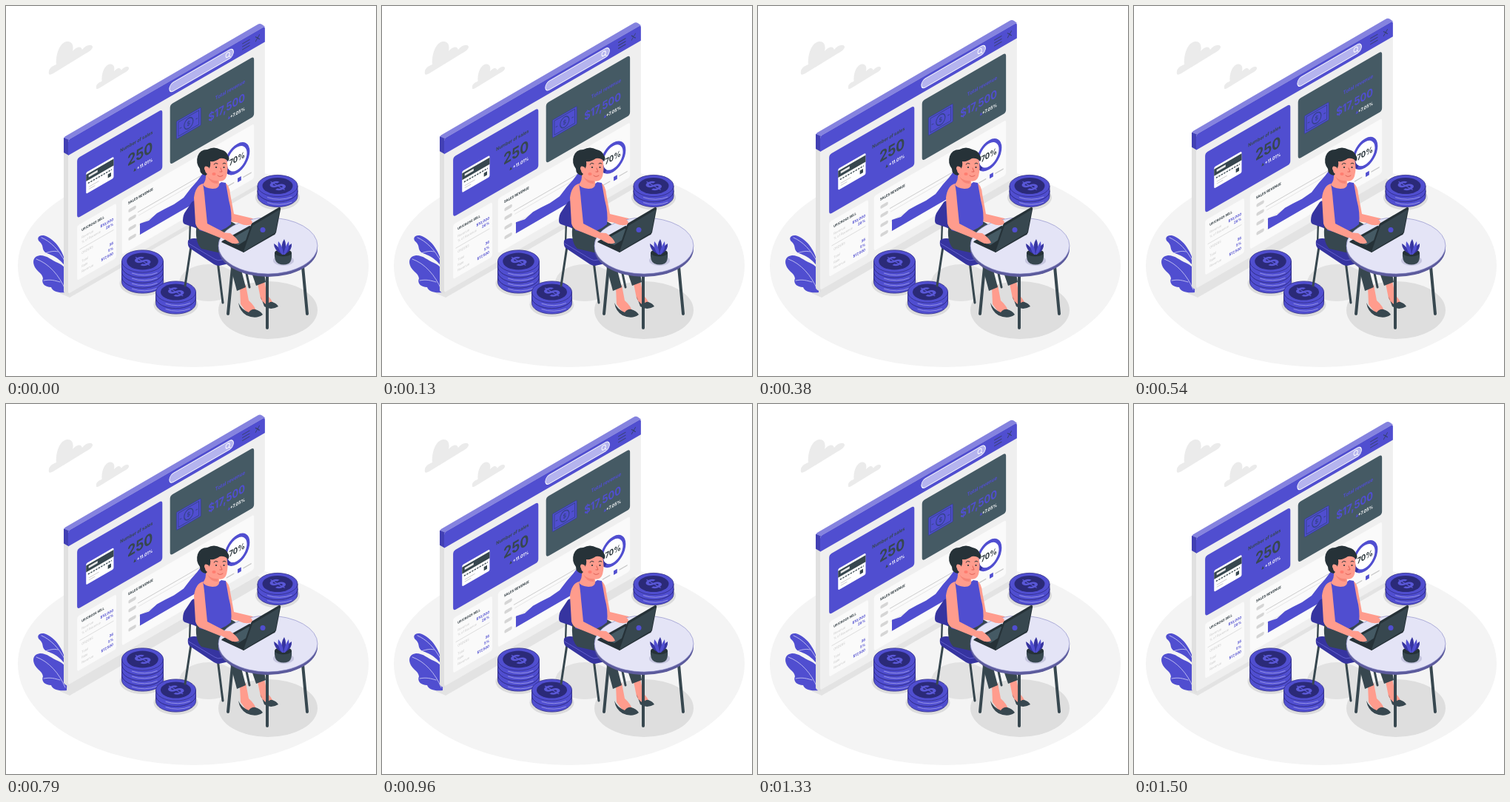
Recreate the animation shown at these times as an HTML page. Size 500 by 500 pixels, loop 1540 ms.

```html
<!DOCTYPE html>
<html lang="en">
<head>
<meta charset="utf-8">
<title>Sales dashboard</title>
<style>
  html, body { margin: 0; width: 100%; height: 100%; overflow: hidden; background: #fff; }
  svg { display: block; width: 100%; height: 100%; }
  text { font-family: Inter, Roboto, sans-serif; font-weight: 700; }
  .p { fill: #504ed0; } .pd { fill: #3634a0; } .pl { fill: #8583df; }
  .d { fill: #37474f; } .k { fill: #263238; } .s { fill: #455a64; }
  .skin { fill: #ff9c8d; } .w { fill: #fff; }
  .line { fill: none; stroke-linecap: round; stroke-linejoin: round; }
  .end { text-anchor: end; } .mid { text-anchor: middle; }
  .small { font-size: 4.5px; } .soft { fill: #c9c9c9; font-weight: 400; }
</style>
</head>
<body>
<svg viewBox="0 0 500 500">
  <ellipse cx="253" cy="351" rx="237" ry="137" fill="#f4f4f4"/>
  <defs>
    <path id="cloud" d="M58 92C57 86 60 82 68 79C67 66 72 50 82 48C89 47 92 53 90 61C95 55 101 53 103 59C108 52 116 51 117 55C117 59 112 62 108 64L64 91Q59 94 58 92Z"/>
  </defs>
  <g fill="#ebebeb">
    <use href="#cloud"/>
    <use href="#cloud" transform="translate(78.5 42.5) scale(.75)"/>
  </g>
  <path fill="#e3e3e3" d="M70 387L86 394L352 240L340 232Z"/>

  <g id="leaves">
    <path class="p" d="M82 354C79 334 68 315 51 310C43 309 41 315 46 319C52 325 47 330 55 334C62 337 70 338 82 354Z"/>
    <path class="p" d="M82 387C71 388 63 386 61 380C53 380 47 375 50 368C49 361 43 360 39 353C35 345 37 338 46 337C56 337 62 344 70 347C77 350 81 354 83 362Z"/>
    <path class="line" stroke="#d5d4f7" stroke-width=".8" d="M48 313C60 318 72 330 80 346M41 342C58 348 72 364 80 383M51 371C60 369 66 371 73 373M53 334C62 331 66 331 70 332"/>
  </g>

  <g id="board">
    <path fill="#e0e0e0" d="M78 196V386Q79 389 85 391V198Z"/>
    <path class="pl" d="M78 179Q79 176 82 175L340 25Q343 23 346 25L350 28L84 183Z"/>
    <path fill="#4240b4" d="M78 178L85 181V202L78 198Z"/>
    <g transform="matrix(.866 -.5 0 1 84 181)">
      <rect width="307" height="208" rx="3" fill="#efefef"/>
      <path class="p" d="M0 21V3Q0 0 3 0H304Q307 0 307 3V21Z"/>
      <rect x="158" y="4" width="100" height="12" rx="6" fill="#b5b4ee" stroke="#fff"/>
      <g class="line" stroke="#fff"><circle cx="249" cy="9.5" r="3"/><path d="M251 12L253 14"/></g>
      <path class="line" stroke="#37416f" stroke-width="1.1" d="M272 6H283M272 10H283M272 14H283M292.5 7L298.500 13M298.500 7L292.500 13"/>

      <rect class="p" x="14" y="32" width="133" height="81" rx="4"/>
      <rect class="s" x="159" y="32" width="131" height="81" rx="4"/>
      <rect x="14" y="123" width="61" height="74" rx="3" fill="#fafafa"/>
      <rect x="84" y="123" width="206" height="74" rx="3" fill="#fafafa"/>

      <g class="end">
        <text class="d" x="132" y="57.5" font-size="6.4">Number of sales</text>
        <text class="d" x="132" y="82" font-size="20.5">250</text>
        <text class="w" x="132" y="94.5" font-size="6.2">+11.01%</text>
        <text class="p" x="276" y="61" font-size="7">Total revenue</text>
        <text class="p" x="276" y="85" font-size="15">$17,500</text>
        <text class="w" x="276" y="97.5" font-size="6.2">+7.05%</text>
      </g>
      <path class="d" d="M102 94L104 90L106 94Z"/>
      <path class="p" d="M249 97L251 93L253 97Z"/>

      <rect class="w" x="28" y="58" width="43" height="29" rx="2"/>
      <path class="d" d="M28 61H71V70H28Z"/>
      <path fill="#e6e6e6" d="M32 63.5H46V66.500H32Z"/>
      <path class="line" stroke="#37474f" stroke-width="1.600" style="stroke-linecap:butt" stroke-dasharray="2.6 1.4" d="M31 74H68"/>
      <path stroke="#ccc" d="M32 79.500H48M32 82.500H42"/>
      <rect class="d" x="62" y="77.500" width="5" height="5"/>

      <rect class="p" x="169" y="59.500" width="38" height="24" rx="1" stroke="#35438a" stroke-width=".8"/>
      <g fill="none" stroke="#35438a">
        <rect x="172" y="62" width="32" height="19"/>
        <circle cx="188" cy="71.500" r="7" stroke-width="1.4"/>
        <path d="M174 71.500H177M199 71.500H202"/>
      </g>
      <text class="mid" x="188" y="74.500" font-size="8" fill="#35438a">$</text>

      <text class="k small" x="21" y="134">UP/CROSS SELL</text>
      <g id="rows" class="small"></g>
      <path stroke="#d2d2d2" stroke-width=".7" d="M18 157H71"/>

      <text class="k" x="93.5" y="134" font-size="4.8">SALES REVENUE</text>
      <path stroke="#e3e3e3" stroke-width=".8" d="M110 157H220M110 170H220M110 183H220"/>
      <path stroke="#bbb" stroke-width=".7" d="M108.500 152H216"/>
      <g id="pills" fill="#d5d5d5"></g>

      <g fill="none" stroke-width="4.4">
        <circle class="w" cx="263.5" cy="157" r="17.6" stroke="#504ed0"/>
        <circle cx="263.5" cy="157" r="17.6" stroke="#3634a0" stroke-dasharray="14 97" stroke-dashoffset="-40"/>
      </g>
      <text class="k mid" x="263.5" y="161" font-size="11">70%</text>
      <rect class="p" x="264.5" y="184" width="5.5" height="5.5"/>
      <path stroke="#c9c9c9" stroke-width="1.4" d="M273 187H286M247 187H259"/>
    </g>
    <path class="p" d="M181 294L193 290L204 280L215 274L227 268L240 259L250 246L258 237L267 225L276 218V254L181 309Z"/>
  </g>

  <ellipse cx="274" cy="374" rx="40" ry="25" fill="#e2e2e2"/>
  <ellipse cx="354" cy="411" rx="67" ry="39" fill="#dedede"/>
  <g id="coins"></g>

  <g id="chair">
    <path class="line" stroke="#37474f" stroke-width="3" d="M250 325L242 378M286 345L293 401M323 352L329 380"/>
    <path class="line" stroke="#37474f" stroke-width="2.4" d="M249 292L248 320"/>
    <path class="pd" d="M239 290Q239 282 243 277L251 265Q255 261 258 266L262 303L254 299L242 295Q239 294 239 290Z"/>
    <path class="pd" d="M246 317Q250 312 262 315L314 338Q316 344 306 347L288 351Q284 351 281 349L248 327Q245 324 246 317Z"/>
    <path class="line" stroke="#6b69d6" stroke-width=".8" d="M247 321L282 342Q286 345 292 343L312 338"/>
  </g>

  <g id="woman">
    <path class="skin" d="M316 380L324 377L328 398Q337 406 338 413L326 415L317 403ZM340 375L349 371L353 391Q360 397 361 404L350 405L344 395Z"/>
    <path class="d" d="M314 401Q318 410 328 414Q332 409 337 410Q344 412 347 417Q338 424 325 418Q316 413 314 401ZM344 392Q345 400 353 404Q356 399 360 400Q366 402 368 406Q358 412 349 406Z"/>
    <path class="d" d="M258 293L302 290Q330 305 343 327L351 373L338 378L326 343L313 338L324 380L312 385L299 336L264 328Q254 318 258 293Z"/>
    <path class="skin" d="M296 239Q302 242 303 254L308 281L333 287Q337 291 333 295L326 295L303 291Q299 288 298 283L291 255Z"/>
    <path class="p" d="M265 241Q279 248 291 238L297 239L301 262Q306 280 304 295Q286 311 261 303L264 266Z"/>
    <path class="skin" d="M270 225L286 231L288 237Q290 247 279 247Q268 246 266 241Q271 236 270 225Z"/>
    <path class="skin" d="M266 240Q256 243 254 259L256 294Q258 301 264 303L291 314L304 321Q310 323 314 319Q309 311 297 307L272 294L269 264Q268 250 266 240Z"/>
    <path fill="#f68577" d="M272 230Q277 237 287 236L286 240Q276 240 272 230Z"/>
    <path class="skin" d="M271 207Q286 198 298 206Q301 219 298 230Q295 239 285 236Q273 233 269 224Z"/>
    <path class="k" d="M270 229Q262 228 262 220Q256 212 259 203Q262 194 272 194Q281 189 290 194Q297 195 300 202Q303 206 300 210Q296 205 289 206Q282 211 276 210Q277 217 274 220Q270 215 269 219Q268 224 272 227Z"/>
    <path class="skin" d="M274 218Q268 214 268 220Q270 226 275 225Z"/>
    <ellipse cx="281" cy="227" rx="2.6" ry="2" fill="#ff7d70"/>
    <circle class="k" cx="284" cy="218" r="1.1"/><circle class="k" cx="294.5" cy="218" r="1.1"/>
    <path class="line" stroke="#263238" d="M281 214Q283 211 286 213M293 213Q295 211 297 213"/>
    <path class="line" stroke="#d9584e" stroke-width=".9" d="M290 219L292 224L289 224M286 229Q289 232 293 229"/>
  </g>

  <g id="table">
    <path class="line" stroke="#37474f" stroke-width="4" d="M306 353L300 416M353 362V435M401 352L407 416"/>
    <path fill="#5c5b9c" d="M287 324V328A67 38 0 0 0 421 328V324Z"/>
    <ellipse cx="354" cy="324" rx="67" ry="38" fill="#e4e4f6" stroke="#8281c5" stroke-width=".6"/>
  </g>

  <g id="laptop">
    <path class="k" d="M291 319Q292 317 295 316L329 297L363 307L321 333Z"/>
    <path class="s" d="M298 318L328 301L342 305L314 323Z"/>
    <path class="skin" d="M291 306L303 307Q313 314 315 320Q308 323 302 319L289 312ZM307 287L327 287Q335 290 332 295Q325 298 316 294Z"/>
    <path class="k" d="M331 296Q332 293 335 292L369 272Q372 272 371 275L365 306Q364 309 361 310L321 333L319 331Z"/>
    <path class="d" d="M333 297L370 275L364 306L321 332Z"/>
    <circle class="p" cx="347" cy="302.5" r="3.5"/>
  </g>

  <g id="pot">
    <ellipse cx="375" cy="344" rx="14" ry="7" fill="#c6c6df"/>
    <path class="d" d="M363 333Q362 345 368 348Q375 351 382 348Q387 345 386 333Z"/>
    <ellipse class="k" cx="374.5" cy="333.5" rx="11.5" ry="5"/>
    <path class="pd" d="M372 335Q362 330 362 321Q369 325 373 334Q371 322 376 315Q380 323 377 334Q380 324 386 321Q387 330 378 335Z"/>
    <path class="p" d="M373 336Q366 327 368 318Q374 324 375 336Q377 325 382 318Q384 328 377 336Z"/>
  </g>
</svg>
<script>
const $ = id => document.getElementById(id);

const rows = [
  [144, "Revenue", "$10,000"], [150.5, "% of Revenue", "26%"], [165, "ORDERS", ""],
  [176, "Total", "36"], [183, "Rate", "5%"], [190, "Revenue", "$17,500"]
];
$("rows").innerHTML = rows.map(([y, label, value]) =>
  `<text class="soft" x="21" y="${y}">${label}</text>
   <text class="p end" x="70.5" y="${y}" font-size="5">${value}</text>`).join("");

$("pills").innerHTML = [143, 155, 168, 181].map(y =>
  `<rect x="94" y="${y - 2}" width="12" height="4.5" rx="2"/>`).join("");

// A pile of n coins; (x, y) is the centre of the top face.
function pile(x, y, rx, n, step) {
  const ry = rx * .54;
  let out = `<ellipse cx="${x}" cy="${y + n * step + 2}" rx="${rx + 3}" ry="${ry + 2}" fill="#dcdcdc"/>`;
  for (let i = n - 1; i >= 0; i--) {
    const top = y + i * step;
    out += `<path class="p" stroke="#2f2d85" stroke-width=".8" d="M${x - rx} ${top}v${step}a${rx} ${ry} 0 0 0 ${2 * rx} 0v${-step}z"/>
      <path class="line" stroke="#a5a3ec" stroke-width=".8" d="M${x - rx * .5} ${top + ry * .87 + 3}a${rx} ${ry} 0 0 0 ${rx * 1.2} -.6"/>
      <ellipse class="p" cx="${x}" cy="${top}" rx="${rx}" ry="${ry}" stroke="#2f2d85" stroke-width=".8"/>`;
  }
  return out + `<ellipse cx="${x}" cy="${y}" rx="${rx * .76}" ry="${ry * .76}" fill="#2b2a78"/>
    <text class="mid" fill="#5a58d8" font-size="24" y="8.7" transform="matrix(.866 -.5 .866 .5 ${x} ${y})">$</text>`;
}
$("coins").innerHTML = pile(367, 243, 27, 2, 7) + pile(184.5, 345, 28, 4, 7) + pile(229.5, 386.5, 27, 2, 7.5);

// The board floats up 10px and back at 24 steps a second.
const LOOP = 1540, FPS = 24, STEPS = 36, RISE = 10;
function draw(now) {
  const step = Math.floor((now % LOOP + 5) * FPS / 1000);
  const phase = Math.min(step / STEPS, 1);
  const lift = RISE * (1 - Math.abs(2 * phase - 1));
  $("board").setAttribute("transform", `translate(0 ${-lift.toFixed(3)})`);
}
const start = performance.now();
function tick() {
  draw(performance.now() - start);
  requestAnimationFrame(tick);
}
tick();
</script>
</body>
</html>
```
